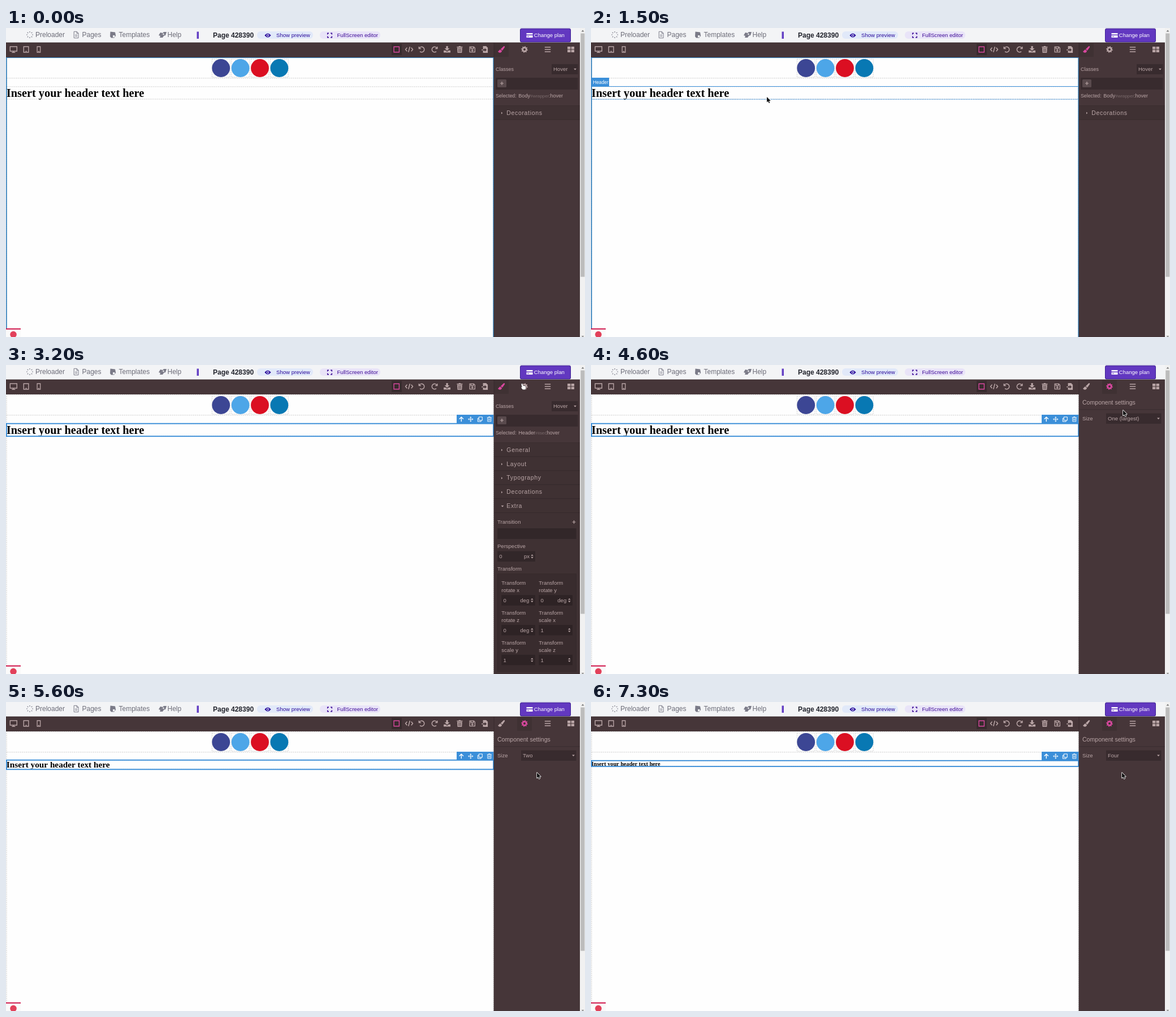
These frames come from a looping animation (1024 px wide and 547 px high, 8000 ms). An HTML page with a canvas:

```html
<!DOCTYPE html>
<html lang="en">
<head>
<meta charset="utf-8">
<title>Page editor</title>
<style>
  html, body { margin: 0; width: 100%; height: 100%; overflow: hidden; background: #fefefe; }
  canvas { display: block; width: 1024px; height: 547px; }
</style>
</head>
<body>
<canvas id="stage" width="1024" height="547"></canvas>
<script>
const ctx = document.getElementById('stage').getContext('2d');
const LOOP = 8000;
const SANS = '"Liberation Sans", Arial, sans-serif';
const SERIF = '"Liberation Serif", "Times New Roman", serif';
const PANEL = '#463639', TEXT = '#b9a5a6', PINK = '#d9489f', BLUE = '#3b8fd9';
const NAV = '#7b7b88', DARK = 'rgba(0,0,0,.2)', SHADE = 'rgba(0,0,0,.1)';

const SIZES = ['One (largest)', 'Two', 'Three', 'Four', 'Five', 'Six (smallest)'];
const HEADINGS = [
  { font: 20.33, top: 103.7, height: 22.5, base: 122 },
  { font: 15.25, top: 102.8, height: 16.5, base: 116.3 },
  { font: 11.9, top: 102, height: 13.2, base: 113 },
  { font: 10.17, top: 103.8, height: 10.3, base: 112.5 }
];

// Pointer path: time, x, y
const PATH = [
  [900, 470, 31], [1100, 385, 82], [1300, 310, 121], [1500, 311, 122], [2300, 311, 122],
  [2400, 419, 173], [2700, 640, 142], [3000, 850, 65], [3200, 912, 33], [4200, 912, 33],
  [4300, 914, 38], [4600, 941, 80], [4700, 941, 80], [4800, 941, 88], [4900, 941, 88],
  [5200, 939, 125], [8000, 939, 125]
];

function pointerAt(time) {
  const t = Math.floor(time / 100) * 100;
  if (t < PATH[0][0]) return null;
  const i = Math.max(1, PATH.findIndex(k => k[0] >= t));
  const [a, b] = [PATH[i - 1], PATH[i]];
  const u = (t - a[0]) / (b[0] - a[0]);
  return { x: a[1] + (b[1] - a[1]) * u, y: a[2] + (b[2] - a[2]) * u };
}

function rect(x, y, w, h, color) {
  ctx.fillStyle = color;
  ctx.fillRect(x, y, w, h);
}

function round(x, y, w, h, r, color) {
  ctx.fillStyle = color;
  ctx.beginPath();
  ctx.roundRect(x, y, w, h, r);
  ctx.fill();
}

function disc(x, y, r, color) {
  ctx.fillStyle = color;
  ctx.beginPath();
  ctx.arc(x, y, r, 0, Math.PI * 2);
  ctx.fill();
}

// y is the middle of the capitals
function text(s, x, y, size = 9.53, color = TEXT, { weight = '', spacing = 0 } = {}) {
  ctx.font = `${weight} ${size}px ${SANS}`;
  ctx.letterSpacing = spacing + 'px';
  ctx.fillStyle = color;
  ctx.fillText(s, x, y + size * 0.355);
  ctx.letterSpacing = '0px';
}

function frame(x, y, w, h, color, width = 1, dash = []) {
  ctx.strokeStyle = color;
  ctx.lineWidth = width;
  ctx.setLineDash(dash);
  ctx.strokeRect(x, y, w, h);
  ctx.setLineDash([]);
}

function line(x1, y1, x2, y2, color, width = 1, dash = []) {
  ctx.strokeStyle = color;
  ctx.lineWidth = width;
  ctx.setLineDash(dash);
  ctx.beginPath();
  ctx.moveTo(x1, y1);
  ctx.lineTo(x2, y2);
  ctx.stroke();
  ctx.setLineDash([]);
}

// Icons are centred on 0,0: stroke width 0 means filled
const ICONS = {
  desktop: ['M-6-5H6V3H-6ZM-3 5.3H3M0 3V5', 1.4],
  tablet: ['M-4.3-5H4.3V5H-4.3ZM-1 3.3H1', 1.4],
  phone: ['M-2.8-5H2.8V5H-2.8ZM-1 3.4H1', 1.3],
  square: ['M-4.7-4.7H4.7V4.7H-4.7Z', 1.4],
  code: ['M-3.7-3.2L-6.4 0L-3.7 3.2M3.7-3.2L6.4 0L3.7 3.2M1.3-4.8L-1.3 4.8', 1.5],
  undo: ['M-5-5V-1.5H-1.5M-4.6-1.8A4.7 4.7 0 1 1-3.3 3.7', 1.5],
  redo: ['M5-5V-1.5H1.5M4.6-1.8A4.7 4.7 0 1 0 3.3 3.7', 1.5],
  download: ['M-1.6-6H1.6V-2H4.4L0 2.3L-4.4-2H-1.6ZM-6 1.8H-2.5L0 4L2.5 1.8H6V5.6H-6Z', 0],
  trash: ['M-5-5H-2L-1.4-6H1.4L2-5H5V-3.6H-5ZM-4.4-2.8H4.4L3.8 6H-3.8ZM-2.2-1.5V4.7H-1.4V-1.5ZM-.4-1.5V4.7H.4V-1.5ZM1.4-1.5V4.7H2.2V-1.5Z', 0],
  save: ['M-4.6-4.6H2.6L4.6-2.6V4.6H-4.6ZM-2.5-4.5V-1.5H2V-4.5M-1.2 1.7A1.2 1.2 0 1 0 1.2 1.7A1.2 1.2 0 1 0-1.2 1.7', 1.3],
  load: ['M-3.5-6H2L5-3V6H-3.5V2H-.5V4L3 .8L-.5-2.4V-.4H-3.5ZM-6 .1H-3.5V1.5H-6Z', 0],
  brush: ['M5.7-5.8Q6.8-5 5.8-3.5L1.8 1.9L-1.2-.5L3.7-5.2Q4.8-6.3 5.7-5.8ZM-1.8 .3L1 2.6Q.8 5.7-2.5 5.7Q-5.5 5.7-6 2.7Q-4.8 3.5-4.2 2Q-3.5 .4-1.8 .3Z', 0],
  menu: ['M-5.2-4H5.2M-5.2 0H5.2M-5.2 4H5.2', 1.6],
  blocks: ['M-6-5H-.6V-.5H-6ZM.6-5H6V-.5H.6ZM-6 .6H-.6V5H-6ZM.6 .6H6V5H.6Z', 0],
  file: ['M-3.8-5.7H1.2L4-2.8V5.7H-3.8ZM1-5.5V-2.6H4M-1.9 .2H2M-1.9 2.6H2', 1],
  template: ['M-4.5-5.5L4-4.5L5.2 1.8L2.5 5.5H-3L-5 3ZM0 1V4.5H3.5V1Z', 0],
  help: ['M-7 1L-4-4L0-3L2-5H7L5 1L2 2L0 5H-5L-4 2ZM-3 1L0-1L3 1L2-3Z', 0],
  eye: ['M-5.7 0Q0-7 5.7 0Q0 7-5.7 0ZM-2.3 0A2.3 2.3 0 1 0 2.3 0A2.3 2.3 0 1 0-2.3 0ZM-1.2 0A1.2 1.2 0 1 0 1.2 0A1.2 1.2 0 1 0-1.2 0Z', 0],
  expand: ['M-3.8-1.5V-3.8H-1.5M1.5-3.8H3.8V-1.5M3.8 1.5V3.8H1.5M-1.5 3.8H-3.8V1.5', 1.5],
  card: ['M-5.5-4H5.5V4H-5.5ZM-5.5-1.5V0H5.5V-1.5ZM-4.2 1.6V2.5H-1V1.6Z', 0],
  up: ['M0 4.2V-3.5M-3.6-.2L0-3.8L3.6-.2', 1.4],
  move: ['M-4 0H4M0-4V4M-2.8-1.4L-4.2 0L-2.8 1.4M2.8-1.4L4.2 0L2.8 1.4M-1.4-2.8L0-4.2L1.4-2.8M-1.4 2.8L0 4.2L1.4 2.8', 1],
  copy: ['M-2-4H4V2H-2ZM-2-1.7H-4V4.2H1.8V2', 1],
  bin: ['M-4-3H4M-1.2-3V-4.2H1.2V-3M-3-3V4H3V-3M-1-1.2V2.5M1-1.2V2.5', .9],
  plus: ['M-3 0H3M0-3V3', 1.2],
  caretDown: ['M-2.4-1.3H2.4L0 1.5Z', 0],
  caretRight: ['M-1-2L1.2 0L-1 2Z', 0],
  spin: ['M-2.3-1L0-3.6L2.3-1ZM-2.3 1L0 3.6L2.3 1Z', 0]
};
const shapes = {};
for (const name in ICONS) shapes[name] = new Path2D(ICONS[name][0]);

function icon(name, x, y, color = TEXT) {
  const width = ICONS[name][1];
  ctx.save();
  ctx.translate(x, y);
  ctx.fillStyle = ctx.strokeStyle = color;
  ctx.lineWidth = width;
  if (width) ctx.stroke(shapes[name]);
  else ctx.fill(shapes[name], 'evenodd');
  ctx.restore();
}

function gear(x, y, color) {
  ctx.beginPath();
  for (let i = 0; i < 32; i++) {
    const a = (i + .5) / 32 * Math.PI * 2, r = i % 4 < 2 ? 5.9 : 4.4;
    ctx.lineTo(x + r * Math.cos(a), y + r * Math.sin(a));
  }
  ctx.closePath();
  ctx.moveTo(x + 2, y);
  ctx.arc(x, y, 2, 0, Math.PI * 2);
  ctx.fillStyle = color;
  ctx.fill('evenodd');
}

function drawNav() {
  rect(0, 0, 1016, 26, '#f3f4f6');
  for (let i = 0; i < 8; i++) {
    const a = i * Math.PI / 4;
    line(42 + 4 * Math.cos(a), 12 + 4 * Math.sin(a), 42 + 6 * Math.cos(a), 12 + 6 * Math.sin(a), NAV, 1.2);
  }
  icon('file', 124, 12, NAV);
  icon('template', 189, 12, NAV);
  icon('help', 277, 12, NAV);
  text('Preloader', 52, 12, 12, '#6c6c78');
  text('Pages', 134.5, 12, 12, '#6c6c78');
  text('Templates', 199.5, 12, 12, '#6c6c78');
  text('Help', 285.5, 12, 12, '#6c6c78');
  rect(337.5, 6.5, 3.5, 12.5, '#6440c4');
  text('Page 428390', 366, 12.5, 12, '#20222b', { weight: 'bold' });
  round(444, 6, 99, 13, 6, '#e1e9f9');
  icon('eye', 463, 13, '#2a0a9a');
  text('Show preview', 478, 13, 9.6, '#2a0a9a');
  round(555, 6, 107, 13, 6, '#e9e4f8');
  icon('expand', 572.5, 13, '#3d0a96');
  text('FullScreen editor', 585.5, 13, 9.6, '#3d0a96');
  round(909, 0.8, 90, 24.4, 3, '#3c1f94');
  round(910, 1.8, 88, 22.4, 2, '#6238c0');
  icon('card', 926, 13, '#fff');
  text('Change plan', 933.8, 13, 9.53, '#fff');
}

function drawToolbar(settings) {
  rect(0, 26, 1015, 26, PANEL);
  rect(0, 25.6, 1015, 1, '#3a2b2e');
  rect(682, 28, 18, 20, DARK);
  ['desktop', 'tablet', 'phone'].forEach((n, i) => icon(n, 13.3 + i * 22.3, 38));
  icon('square', 690.7, 38, PINK);
  ['code', 'undo', 'redo', 'download', 'trash', 'save', 'load']
    .forEach((n, i) => icon(n, 713 + i * 22.35, 38));
  rect(settings ? 904 : 863, 27, 26, 24, SHADE);
  icon('brush', 876, 38, settings ? TEXT : PINK);
  gear(917, 38, settings ? PINK : TEXT);
  icon('menu', 958, 38);
  icon('blocks', 999, 38);
}

function select(x, y, w, h, label) {
  rect(x, y, w, h, DARK);
  text(label, x + 3, y + h / 2, 9.53);
  icon('caretDown', x + w - 5, y + h / 2);
}

function field(x, y, w, value, unit = '') {
  rect(x, y, w, 18.5, DARK);
  text(value, x + 3.3, y + 9.3);
  text(unit, x + w - (unit === 'px' ? 20 : 26.5), y + 9.3);
  icon('spin', x + w - 5.5, y + 9.3);
}

function section(label, y, open) {
  rect(863, y - 12.4, 152, 24.8, SHADE);
  rect(863, y + 11.8, 152, .7, 'rgba(0,0,0,.25)');
  icon(open ? 'caretDown' : 'caretRight', open ? 878 : 877, y + .6);
  text(label, 885.3, y, 10.5, TEXT, { spacing: .66 });
}

function drawStyles(header) {
  text('Classes', 866, 73, 9);
  select(965, 64, 46.5, 18, 'Hover');
  rect(866, 88, 145.5, 21, DARK);
  round(869, 91, 16, 14, 1.5, '#594a4d');
  icon('plus', 877, 98);
  text('Selected:', 866, 120, 8.8);
  text(header ? 'Header' : 'Body', 906.3, 120, 9.1);
  text(header ? '#iiser' : '#wrapper', header ? 936 : 927.3, 120.3, 7.9, '#79696b');
  text(':hover', header ? 954 : 960, 120, 9);
  rect(863, 137, 152, .7, DARK);
  if (!header) return section('Decorations', 150);

  ['General', 'Layout', 'Typography', 'Decorations', 'Extra']
    .forEach((s, i) => section(s, 150 + i * 24.85, i === 4));
  rect(863, 262, 152, 285, SHADE);
  text('Transition', 869, 278);
  icon('plus', 1004.5, 278);
  rect(869, 289, 139.5, 19, DARK);
  text('Perspective', 869, 321);
  field(869, 329.5, 67, '0', 'px');
  text('Transform', 869, 361);
  rect(869, 369.5, 139.5, 173, SHADE);
  frame(869.3, 369.8, 139, 173, 'rgba(0,0,0,.15)', .7);
  ['rotate x', 'rotate y', 'rotate z', 'scale x', 'scale y', 'scale z'].forEach((s, i) => {
    const x = i % 2 ? 942.3 : 876.3, y = 386 + Math.floor(i / 2) * 52.8;
    text('Transform', x, y);
    text(s, x, y + 12.8);
    field(x, y + 21.3, 59.5, i < 3 ? '0' : '1', i < 3 ? 'deg' : '');
  });
}

function drawSettings(size) {
  text('Component settings', 869, 66, 10.55);
  rect(863, 78.5, 152, .8, 'rgba(0,0,0,.25)');
  text('Size', 869, 95);
  select(911, 85.5, 97.5, 18.5, SIZES[size]);
}

function drawDropdown(pointer) {
  rect(911, 104, 98, 74.5, '#3c2d30');
  const active = Math.max(0, Math.floor((pointer.y - 104.5) / 12.2));
  SIZES.forEach((s, i) => {
    const y = 104.5 + i * 12.2;
    if (i === active) rect(911.5, y, 97, 12.2, '#c8c8c8');
    text(s, 914, y + 6.1, 9.53, i === active ? '#30282a' : TEXT);
  });
}

function tag(label, y, w) {
  rect(0.5, y, w, 15.2, BLUE);
  text(label, 3.5, y + 7.7, 8.3, '#fff');
}

function drawPage(time, pointer) {
  const chosen = time >= 1800;
  const size = time < 5600 ? 0 : time < 6600 ? 1 : time < 7300 ? 2 : 3;
  const h = HEADINGS[size];
  const dash = [2, 1.4], gray = '#bdbdbd';
  const inside = pointer && pointer.x < 862 && pointer.y > 52;
  const overBody = inside && pointer.y > 126;
  const overHeader = inside && pointer.y > 103 && !overBody;

  rect(0, 52, 863, 495, '#fefefe');
  frame(1, 52.5, 861, 496, gray, .8, dash);
  line(1, 88.8, 862, 88.8, gray, .8, dash);
  frame(1, h.top + .2, 861, h.height - .5, gray, .8, dash);
  ['#3c4694', '#4da6e8', '#db0f22', '#0878b3'].forEach((c, i) => {
    const x = 380.2 + i * 34.4;
    frame(x - 15.8, 55, 31.6, 32, gray, .7, dash);
    disc(x, 71, 15.9, c);
  });
  ctx.font = `bold ${h.font}px ${SERIF}`;
  ctx.fillStyle = '#000';
  ctx.fillText('Insert your header text here', .8, h.base);

  if (!chosen) {
    frame(.9, 52.3, 861.2, 497, '#3380bd', 1.6);
    if (overHeader) {
      line(0, 103.5, 862, 103.5, BLUE);
      line(0, 126.2, 862, 126.2, BLUE, 1, [2, 1]);
      tag('Header', 88, 31.5);
    }
  } else {
    if (overBody) {
      frame(1, 52.5, 861, 496, BLUE, .9, dash);
      tag('Body', 52, 23.5);
    }
    frame(.9, h.top, 861.2, h.height, BLUE, 1.9);
    rect(797, 88, 65.5, 15.2, BLUE);
    ['up', 'move', 'copy', 'bin'].forEach((n, i) => icon(n, 805.3 + i * 16.5, 96, '#fff'));
  }
  rect(0, 532, 26, 15, '#fafafa');
  rect(0, 531.7, 26, 2, '#cf1248');
  disc(13, 542.5, 5.8, '#e2405a');
  return size;
}

function drawScrollbar() {
  rect(1015, 0, 9, 547, '#f1f1f1');
  rect(1016.3, 9.5, 7, 431, '#bcbcbc');
  ctx.fillStyle = '#7a7a7a';
  ctx.fill(new Path2D('M1017.5 6.5H1022.5L1020 3.5ZM1017.5 545H1022.5L1020 547Z'));
}

const ARROW = new Path2D('M0 0V9.6L2.2 7.6L3.7 11L5.3 10.3L3.8 7H6.8Z');
const HAND = new Path2D('M-.8 .6Q.2-.8 1.2 .6L2.5 3.7L5.5 4Q7.5 4.3 7.3 6.5L6.5 10.5H2L-.8 7.3Q-1.2 5.8 .8 6.3Z');

function drawPointer(p) {
  const hand = p.x > 900 && p.y < 50;
  const shape = hand ? HAND : ARROW;
  ctx.save();
  ctx.translate(p.x, p.y);
  ctx.lineJoin = 'round';
  ctx.lineWidth = hand ? 1 : 1.5;
  ctx.strokeStyle = hand ? '#222' : '#fff';
  ctx.fillStyle = hand ? '#fff' : '#111';
  ctx.stroke(shape);
  ctx.fill(shape);
  ctx.restore();
}

function draw() {
  const time = performance.now() % LOOP;
  const pointer = pointerAt(time);
  const settings = time >= 3900;
  drawNav();
  const size = drawPage(time, pointer);
  rect(863, 52, 152, 495, PANEL);
  drawToolbar(settings);
  rect(862.6, 26, .8, 521, '#35282b');
  if (settings) drawSettings(size);
  else drawStyles(time >= 1900);
  if (time >= 4800 && time < 5600) drawDropdown(pointer);
  drawScrollbar();
  if (pointer) drawPointer(pointer);
  requestAnimationFrame(draw);
}
draw();
</script>
</body>
</html>
```
